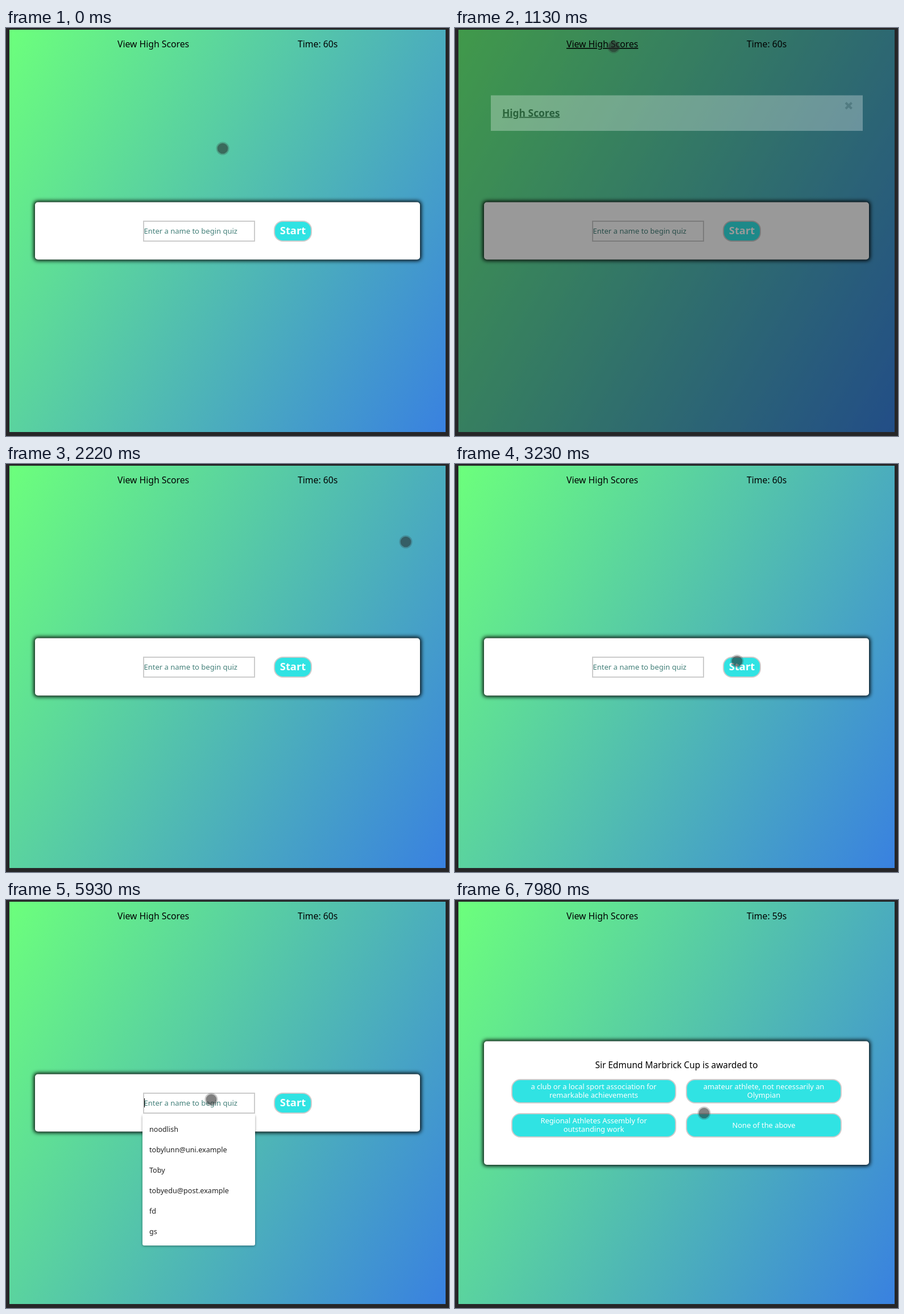
An HTML page for the animation above (8 s loop, 779 by 718 pixels).

```html
<!DOCTYPE html>
<html lang="en">
<head>
<meta charset="utf-8">
<title>Quiz</title>
<style>
  html, body { margin: 0; width: 100%; height: 100%; overflow: hidden; background: #262628; }
  svg { display: block; font-family: "Noto Sans", "Open Sans", sans-serif; }
  .nav { font-size: 15.75px; }
  .small { font-size: 13px; }
  .item { font-size: 12.6px; fill: #222; }
  .start { font-size: 18.3px; font-weight: 600; fill: #fff; text-anchor: middle; }
  .question { font-size: 15.4px; font-weight: 500; text-anchor: middle; }
  .answer { font-size: 12.85px; font-weight: 500; fill: #fff; text-anchor: middle; }
  .field { stroke: #ccc; stroke-width: 2; fill: #fff; }
  .button { stroke: #ccc; stroke-width: 2; fill: #30e3e3; }
</style>
</head>
<body>
<svg width="779" height="718" viewBox="0 0 779 718">
  <defs>
    <linearGradient id="sky" gradientUnits="userSpaceOnUse" x1="-51.3" y1="102.5" x2="830.3" y2="611.5">
      <stop offset="0" stop-color="#6cff7c"/>
      <stop offset="1" stop-color="#3981e0"/>
    </linearGradient>
    <filter id="glow" filterUnits="userSpaceOnUse" x="20" y="200" width="740" height="320">
      <feGaussianBlur stdDeviation="3.6"/>
    </filter>
    <filter id="soft" filterUnits="userSpaceOnUse" x="220" y="-60" width="640" height="700">
      <feGaussianBlur stdDeviation="2"/>
    </filter>
  </defs>

  <rect width="779" height="718" fill="#262628"/>
  <rect x="6" y="3" width="767" height="708" fill="url(#sky)"/>
  <text id="link" class="nav" x="196" y="34">View High Scores</text>
  <text id="timer" class="nav" x="513" y="34"></text>

  <g id="cardShadow" filter="url(#glow)"><rect id="shadow" x="49" width="681" rx="6"/></g>
  <rect id="card" x="51" width="677" rx="5" fill="#fff"/>

  <g id="intro">
    <rect id="field" class="field" x="242" y="340" width="195" height="35"/>
    <text id="name" class="small" x="242.5" y="361.5"></text>
    <path id="caret" d="M243.5 349v16" stroke="#000"/>
    <rect class="button" x="472" y="340" width="65" height="35" rx="15"/>
    <text class="start" x="504.5" y="363">Start</text>
  </g>

  <g id="quiz">
    <text class="question" x="389.5" y="295.5">Sir Edmund Marbrick Cup is awarded to</text>
  </g>

  <g id="menu">
    <rect x="240" y="379" width="198" height="230" rx="3" opacity=".4" filter="url(#soft)"/>
    <rect x="240" y="376" width="198" height="232" rx="3" fill="#fff"/>
    <rect id="hover" x="240" y="385" width="198" height="36" fill="#eee"/>
  </g>

  <rect id="dim" width="767" height="708" x="6" y="3"/>
  <g id="modal">
    <rect x="63" y="118.5" width="654" height="62.5" fill="#fff"/>
    <text x="83" y="155.5" font-size="17.4" font-weight="600" text-decoration="underline">High Scores</text>
    <path d="M687 131.500l10.500 10.500m0-10.500l-10.500 10.500" stroke="#aaa" stroke-width="4"/>
  </g>

  <g id="alert">
    <rect x="398" y="-20" width="400" height="51" rx="4" opacity=".65" filter="url(#soft)"/>
    <rect x="398" y="-20" width="400" height="50" rx="4" fill="#fff"/>
    <rect id="ok" x="766" y="-18" width="40" height="32" rx="4"/>
  </g>

  <g id="cursor">
    <circle r="11.5" fill="#333" opacity=".25"/>
    <circle r="9.3" fill="#222" opacity=".44"/>
  </g>
</svg>

<script>
const LOOP = 8000;
const NS = "http://www.w3.org/2000/svg";
const el = id => document.getElementById(id);
const clamp = v => Math.max(0, Math.min(1, v));
const swing = v => 0.5 - Math.cos(Math.PI * clamp(v)) / 2;
const during = (t, from, to) => t >= from && t < to;
const show = (id, visible) => el(id).setAttribute("display", visible ? "inline" : "none");

function add(parent, tag, attrs, text = "") {
  const node = document.createElementNS(NS, tag);
  for (const key in attrs) node.setAttribute(key, attrs[key]);
  node.textContent = text;
  el(parent).append(node);
}

function addAnswer(x, y, width, lines) {
  add("quiz", "rect", { class: "button", x, y, width, height: 41, rx: 15 });
  lines.forEach((line, i) => add("quiz", "text", {
    class: "answer",
    x: x + width / 2,
    y: y + 24.7 + (i - (lines.length - 1) / 2) * 15
  }, line));
}

addAnswer(100, 316, 288, ["a club or a local sport association for", "remarkable achievements"]);
addAnswer(407, 316, 272, ["amateur athlete, not necessarily an", "Olympian"]);
addAnswer(100, 376, 288, ["Regional Athletes Assembly for", "outstanding work"]);
addAnswer(407, 376, 272, ["None of the above"]);

const NAMES = ["noodlish", "tobylunn@uni.example", "Toby", "tobyedu@post.example", "fd", "gs"];
NAMES.forEach((name, i) => add("menu", "text", { class: "item", x: 252, y: 407.5 + i * 36 }, name));

// Pointer stops: time, x, y
const STOPS = [
  [0, 381, 212], [570, 279, 33],
  [1180, 279, 33], [1600, 724, 130], [1820, 703, 137],
  [2400, 703, 137], [2880, 416, 325], [3200, 496, 347],
  [3230, 496, 347], [3400, 497, 359], [3560, 505, 345], [4010, 713, 50],
  [4070, 716, 48], [4220, 795, 41],
  [4990, 795, 60], [5580, 361, 351],
  [5930, 361, 351], [6170, 305, 402], [6240, 305, 402], [6560, 495, 357],
  [7270, 495, 357], [7620, 344, 366], [7960, 438, 375], [LOOP, 438, 375]
];

function pointerAt(t) {
  const i = Math.max(1, STOPS.findIndex(stop => stop[0] > t));
  const [t0, x0, y0] = STOPS[i - 1];
  const [t1, x1, y1] = STOPS[i];
  const k = swing((t - t0) / (t1 - t0));
  return [x0 + (x1 - x0) * k, y0 + (y1 - y0) * k];
}

function setCard(y, height) {
  el("card").setAttribute("y", y);
  el("card").setAttribute("height", height);
  el("shadow").setAttribute("y", y - 2);
  el("shadow").setAttribute("height", height + 4);
}

function render(t) {
  const playing = t >= 6930;
  const filled = t >= 6230;
  const closing = 1 - swing((t - 1850) / 250);

  el("cursor").setAttribute("transform", `translate(${pointerAt(t)})`);
  el("link").setAttribute("text-decoration", during(t, 780, 1250) ? "underline" : "none");
  el("timer").textContent = `Time: ${t >= 7930 ? 59 : 60}s`;

  el("dim").setAttribute("opacity", (t < 780 ? 0 : t < 850 ? 0.2 : 0.4) * closing);
  el("modal").setAttribute("opacity", swing((t - 1040) / 250) * closing);

  show("alert", during(t, 3500, 4980));
  el("ok").setAttribute("fill", during(t, 4430, 4540) ? "#3b78e0" : "#4285f4");

  show("menu", during(t, 5640, 6230));
  show("hover", during(t, 6080, 6230));
  show("caret", during(t, 5610, 6230));
  el("name").textContent = filled ? NAMES[0] : "Enter a name to begin quiz";
  el("name").setAttribute("fill", filled ? "#000" : "#44807a");
  el("field").style.fill = filled ? "#e8f0fe" : "#fff";

  show("intro", !playing);
  show("quiz", playing);
  if (playing) setCard(248.5, 217.5);
  else setCard(306.5, 101);
}

const begin = performance.now();
function tick() {
  render((performance.now() - begin) % LOOP);
  requestAnimationFrame(tick);
}
tick();
</script>
</body>
</html>
```
